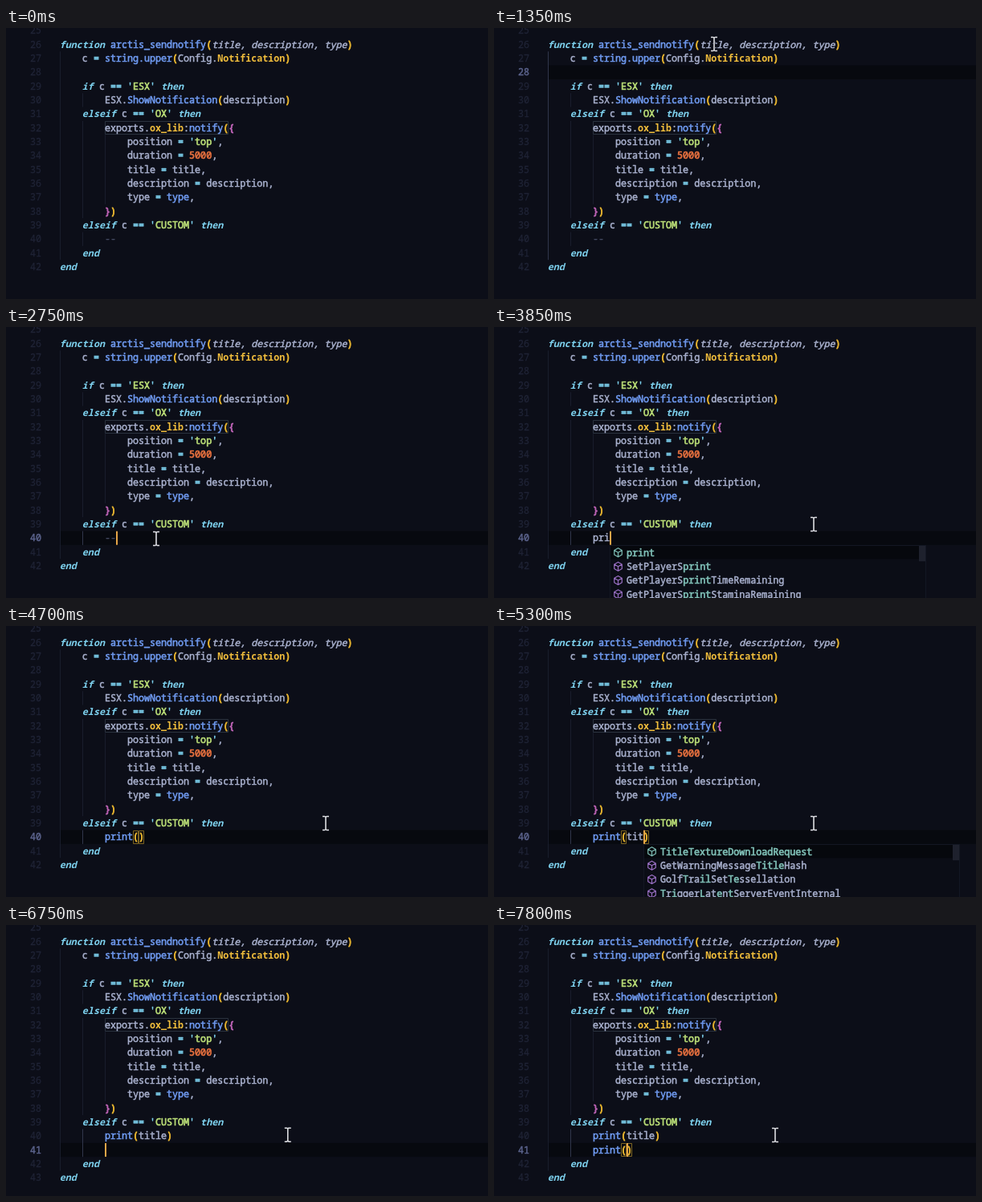
Write an HTML page with a canvas that moves like this. It is 600x338 px and loops after 8 s.

```html
<!DOCTYPE html>
<html lang="en">
<head>
<meta charset="utf-8">
<title>Editing a Lua function</title>
<style>
  html, body { margin: 0; width: 100%; height: 100%; overflow: hidden; background: #0c0e18; }
  canvas { display: block; width: 600px; height: 338px; }
</style>
</head>
<body>
<canvas id="stage" width="600" height="338"></canvas>
<script>
const ctx = document.getElementById('stage').getContext('2d');
const LOOP = 8000, LEFT = 66.8, LINE = 17.33, SIZE = 11.7;
const FAMILY = 'px "Noto Sans Mono", "DejaVu Sans Mono", monospace';

// Markup: "~" plus a style key switches the style of the text that follows.
// Each style is a colour, a face and the width of a thickening outline.
const STYLES = {
  w: ['#aab2cf', '400', .5],
  i: ['#aab2cf', 'italic 400', .5],
  k: ['#7ed2ef', 'italic 700', 0],
  o: ['#7ed2ef', '400', .6],
  b: ['#6f9af0', '400', .6],
  y: ['#e8b52f', '400', .9],
  Y: ['#f0bd3c', '700', 0],
  m: ['#bd63b5', '400', .9],
  s: ['#b9dc76', '400', .7],
  n: ['#e8713f', '400', .7],
  c: ['#474d66', '400', .3],
  d: ['#1f2335', '400', .3],
  a: ['#5b638c', '400', .5],
  t: ['#7fbfb6', '400', .7]
};

const HEAD = [
  '~kfunction ~barctis_sendnotify~y(~ititle, description, type~y)',
  '    ~wc ~o= ~bstring.upper~y(~wConfig.~YNotification~y)',
  '',
  "    ~kif ~wc ~o== '~sESX~o' ~kthen",
  '        ~wESX.~bShowNotification~y(~wdescription~y)',
  "    ~kelseif ~wc ~o== '~sOX~o' ~kthen",
  '        ~wexports.~Yox_lib~w:~bnotify~y(~m{',
  "            ~wposition ~o= '~stop~o'~w,",
  '            ~wduration ~o= ~n5000~w,',
  '            ~wtitle ~o= ~wtitle,',
  '            ~wdescription ~o= ~wdescription,',
  '            ~wtype ~o= ~btype~w,',
  '        ~m}~y)',
  "    ~kelseif ~wc ~o== '~sCUSTOM~o' ~kthen"
];
const TAIL = ['    ~kend', '~kend'];

const TITLE_HINTS = [
  '~tTitleTextureDownloadRequest',
  '~wGetWarningMessage~tTitle~wHash',
  '~wGolf~tT~wra~til~wSet~tTe~wssellation',
  '~tT~wr~ti~wgger~tL~wat~te~wn~tt~wServerEventInternal'
];
const PRINT_HINTS = [
  '~tprint',
  '~wSetPlayerS~tprint',
  '~wGetPlayerS~tprint~wTimeRemaining',
  '~wGetPlayerS~tprint~wStaminaRemaining'
];

// time, x, y of the pointer
const POINTER = [
  [650, 300, 120], [850, 270, 56], [950, 268, 54], [1200, 262, 20], [1350, 274, 20],
  [1700, 335, 20], [2050, 414, 20], [2300, 398, 40], [2650, 187, 264], [2780, 187, 264],
  [3000, 398, 246], [6400, 398, 246], [6780, 350, 262]
];

ctx.font = '400 ' + SIZE + FAMILY;
ctx.lineJoin = 'round';
const CHAR = ctx.measureText('0').width;
const colX = col => LEFT + col * CHAR;
const rowY = row => 20.6 + (row - 26) * LINE;

function write(markup, x, y) {
  let style = 'w';
  markup.split('~').forEach((part, index) => {
    if (index) { style = part[0]; part = part.slice(1); }
    const [color, face, outline] = STYLES[style];
    ctx.font = face + ' ' + SIZE + FAMILY;
    ctx.fillStyle = ctx.strokeStyle = color;
    ctx.fillText(part, x, y + 4.2);
    if (outline) {
      ctx.lineWidth = outline;
      ctx.strokeText(part, x, y + 4.2);
    }
    x += part.length * CHAR;
  });
}

function typed(word, start, t) {
  return word.slice(0, Math.max(0, Math.floor((t - start) / 85) + 1));
}

const printLine = arg => '        ~bprint~y(~w' + arg + '~y)';

function typePrint(s, start, close, t) {
  const word = typed('print', start, t);
  const closed = t >= close;
  s.col = 8 + word.length + (closed ? 1 : 0);
  if (closed) s.brackets = [13, 14];
  else if (t >= start + 140) s.hints = PRINT_HINTS;
  return closed ? printLine('') : '        ~' + (word === 'print' ? 'b' : 'w') + word;
}

function editorState(t) {
  const s = { row: 0, col: 0, caret: false, body: ['        ~c--'] };
  if (t >= 800 && t < 2650) {
    s.row = 28;
  } else if (t >= 2650 && t < 6350) {
    s.row = 40;
    s.caret = true;
    if (t < 3650) {
      const dashes = t < 3300 ? '--' : t < 3450 ? '-' : '';
      s.body = ['        ~c' + dashes];
      s.col = 8 + dashes.length;
      s.caret = t < 3200 || t >= 3300;
    } else if (t < 5050) {
      s.body = [typePrint(s, 3650, 4250, t)];
      s.caret = t < 4700;
    } else {
      const arg = typed('title', 5050, t);
      s.body = [printLine(arg)];
      s.col = 14 + arg.length;
      s.brackets = [13, s.col];
      s.caret = t < 5900;
      if (t >= 5190 && t < 6200) s.hints = TITLE_HINTS;
    }
  } else if (t >= 6350) {
    s.row = 41;
    s.col = 8;
    s.caret = true;
    s.body = [printLine('title'), t < 7050 ? '' : typePrint(s, 7050, 7700, t)];
  }
  return s;
}

function guide(col, first, last, color = '#191d2c') {
  ctx.fillStyle = color;
  ctx.fillRect(Math.round(colX(col)), rowY(first) - LINE / 2, 1, (last - first + 1) * LINE);
}

function frame(col, row, length, color) {
  ctx.strokeStyle = color;
  ctx.lineWidth = 1;
  ctx.strokeRect(Math.round(colX(col)) + .5, Math.round(rowY(row) - 8.3) + .5, Math.round(length * CHAR) - 1, 16);
}

function drawGuides(row, bodyEnd) {
  const lit = '#30364b';
  guide(0, 27, bodyEnd + 1, row === 28 ? lit : undefined);
  guide(4, 30, 30);
  guide(4, 32, 38);
  guide(4, 40, bodyEnd, row >= 40 ? lit : undefined);
  guide(8, 33, 37);
}

function drawCube(x, y, color) {
  const r = 5.5;
  const point = k => [x + r * Math.sin(k * Math.PI / 3), y - r * Math.cos(k * Math.PI / 3)];
  ctx.beginPath();
  for (let k = 0; k < 6; k++) ctx.lineTo(...point(k));
  ctx.closePath();
  for (const k of [1, 3, 5]) {
    ctx.moveTo(x, y);
    ctx.lineTo(...point(k));
  }
  ctx.strokeStyle = color;
  ctx.lineWidth = 1.2;
  ctx.stroke();
}

function drawHints(hints, row, col) {
  const x = Math.round(colX(col)), top = rowY(row) + 9;
  ctx.fillStyle = '#0b0d16';
  ctx.fillRect(x, top, 394, 338 - top);
  ctx.fillStyle = '#06080d';
  ctx.fillRect(x, top, 394, LINE);
  ctx.fillStyle = '#1e212d';
  ctx.fillRect(x + 385, top, 9, 20);
  ctx.strokeStyle = '#131723';
  ctx.lineWidth = 1;
  ctx.strokeRect(x + .5, Math.round(top) + .5, 393, 100);
  hints.forEach((hint, index) => {
    const y = rowY(row + 1 + index) + .8;
    drawCube(x + 10.5, y, index ? '#9a70c4' : '#7fbfb6');
    write(hint, x + 21, y);
  });
}

function pointerAt(t) {
  const next = POINTER.findIndex(p => p[0] > t);
  if (next < 0) return POINTER[POINTER.length - 1].slice(1);
  const [t0, x0, y0] = POINTER[next - 1], [t1, x1, y1] = POINTER[next];
  const u = (t - t0) / (t1 - t0), e = u * u * (3 - 2 * u);
  return [x0 + (x1 - x0) * e, y0 + (y1 - y0) * e];
}

function drawPointer(t) {
  if (t < POINTER[0][0]) return;
  const [x, y] = pointerAt(t);
  ctx.beginPath();
  for (const side of [-1, 1]) {
    ctx.moveTo(x - 4, y + side * 8.5);
    ctx.lineTo(x - 1.2, y + side * 8.5);
    ctx.lineTo(x, y + side * 7.5);
    ctx.lineTo(x + 1.2, y + side * 8.5);
    ctx.lineTo(x + 4, y + side * 8.5);
  }
  ctx.moveTo(x, y - 8);
  ctx.lineTo(x, y + 8);
  ctx.strokeStyle = '#0c0e18';
  ctx.lineWidth = 3;
  ctx.stroke();
  ctx.strokeStyle = '#dedfe3';
  ctx.lineWidth = 1.6;
  ctx.stroke();
}

function draw(t) {
  const s = editorState(t);
  const lines = [...HEAD, ...s.body, ...TAIL];
  ctx.fillStyle = '#0c0e18';
  ctx.fillRect(0, 0, 600, 338);
  if (s.row) {
    ctx.fillStyle = '#07090f';
    ctx.fillRect(LEFT, rowY(s.row) - LINE / 2, 600 - LEFT, LINE);
  }
  drawGuides(s.row, 39 + s.body.length);
  frame(8, 32, 22, '#2a323e');
  write('~d25', 30, rowY(25));
  lines.forEach((line, index) => {
    const row = 26 + index;
    write((row === s.row ? '~a' : '~d') + row, 30, rowY(row));
    write(line, LEFT, rowY(row));
  });
  if (s.brackets) s.brackets.forEach(col => frame(col, s.row, 1, '#7d6522'));
  if (s.caret && s.col) {
    ctx.fillStyle = '#e6a548';
    ctx.fillRect(Math.round(colX(s.col)), rowY(s.row) - 8.5, 2, 17);
  }
  if (s.hints) drawHints(s.hints, s.row, s.col);
  drawPointer(t);
}

function tick() {
  draw(performance.now() % LOOP);
  requestAnimationFrame(tick);
}
tick();
</script>
</body>
</html>
```
